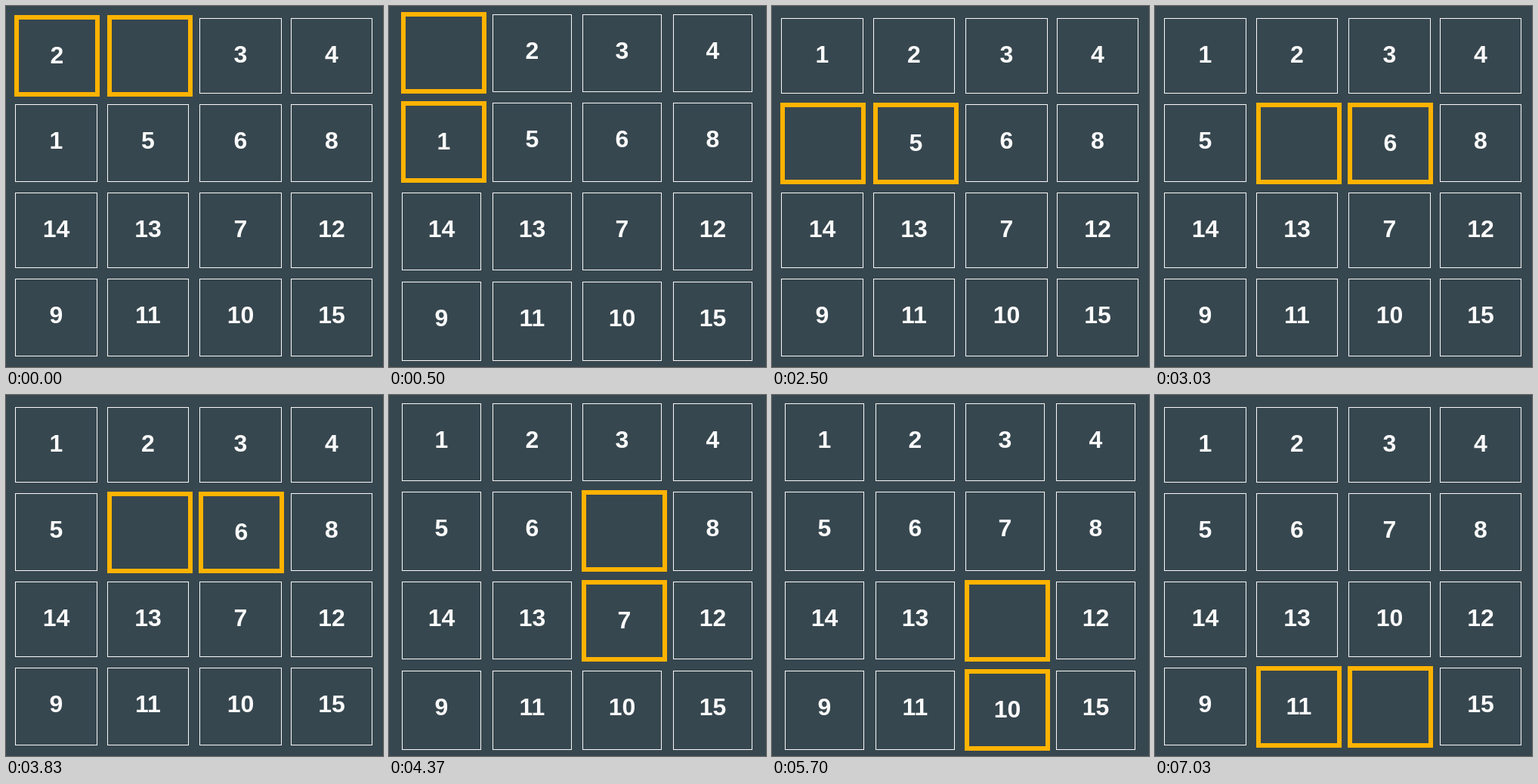
Write an HTML page that moves like this. It is 499 by 478 pixels and loops after 8000 ms.

```html
<!DOCTYPE html>
<html lang="en">
<head>
<meta charset="utf-8">
<title>Fifteen puzzle</title>
<style>
  html, body { margin: 0; height: 100%; overflow: hidden; background: #37474f; }
  svg { display: block; width: 499px; height: 478px; }
  rect { fill: none; stroke: #fafafa; stroke-width: 1; }
  .active { stroke: #ffb300; stroke-width: 6; }
  text { fill: #fafafa; font: bold 32px "Liberation Sans", Arial, sans-serif; text-anchor: middle; }
</style>
</head>
<body>
<svg id="board" viewBox="0 0 499 478"></svg>
<script>
const LOOP = 8000;
const STARTS = [0, 500, 1700, 3030, 4370, 5700, 7030];
// Cells the gap visits; each step highlights the gap and its next cell.
const PATH = [1, 0, 4, 5, 6, 10, 14, 13];
const TILES = [2, 0, 3, 4, 1, 5, 6, 8, 14, 13, 7, 12, 9, 11, 10, 15];

// The table reflows depending on whether a row or a column pair is highlighted.
const ROW_PAIR = {
  x: [12, 134, 256, 377], w: [109, 108, 109, 108],
  y: [16, 130, 247, 361], h: [100, 103, 100, 103],
  activeX: [11, 134, 255, 377], activeY: [12, 128, 245, 359]
};
const COLUMN_PAIR = {
  x: [17, 137, 256, 376], w: [105, 105, 105, 105],
  y: [11, 128, 247, 365], h: [103, 105, 103, 105],
  activeX: [16, 137, 255, 376], activeY: [8, 126, 245, 363]
};

function tilesAt(step) {
  const tiles = [...TILES];
  for (let i = 0; i < step; i++) {
    tiles[PATH[i]] = tiles[PATH[i + 1]];
    tiles[PATH[i + 1]] = 0;
  }
  return tiles;
}

function cell(x, y, w, h, line, baseline, value, name) {
  const box = `<rect class="${name}" x="${x + line / 2}" y="${y + line / 2}" width="${w - line}" height="${h - line}"/>`;
  return box + (value ? `<text x="${x + w / 2}" y="${y + baseline}">${value}</text>` : "");
}

function render(step) {
  const pair = [PATH[step], PATH[step + 1]];
  const grid = Math.abs(pair[0] - pair[1]) === 1 ? ROW_PAIR : COLUMN_PAIR;
  return tilesAt(step).map((value, i) => {
    const c = i % 4, r = i >> 2;
    return pair.includes(i)
      ? cell(grid.activeX[c], grid.activeY[r], 113, 108, 6, 64, value, "active")
      : cell(grid.x[c], grid.y[r], grid.w[c], grid.h[r], 1, 59, value, "tile");
  }).join("");
}

const board = document.getElementById("board");
const origin = performance.now();
let shown = -1;

function draw(now) {
  const time = Math.max(0, now - origin) % LOOP;
  const step = STARTS.findLastIndex(start => time >= start);
  if (step !== shown) {
    board.innerHTML = render(step);
    shown = step;
  }
  requestAnimationFrame(draw);
}
draw(origin);
</script>
</body>
</html>
```
